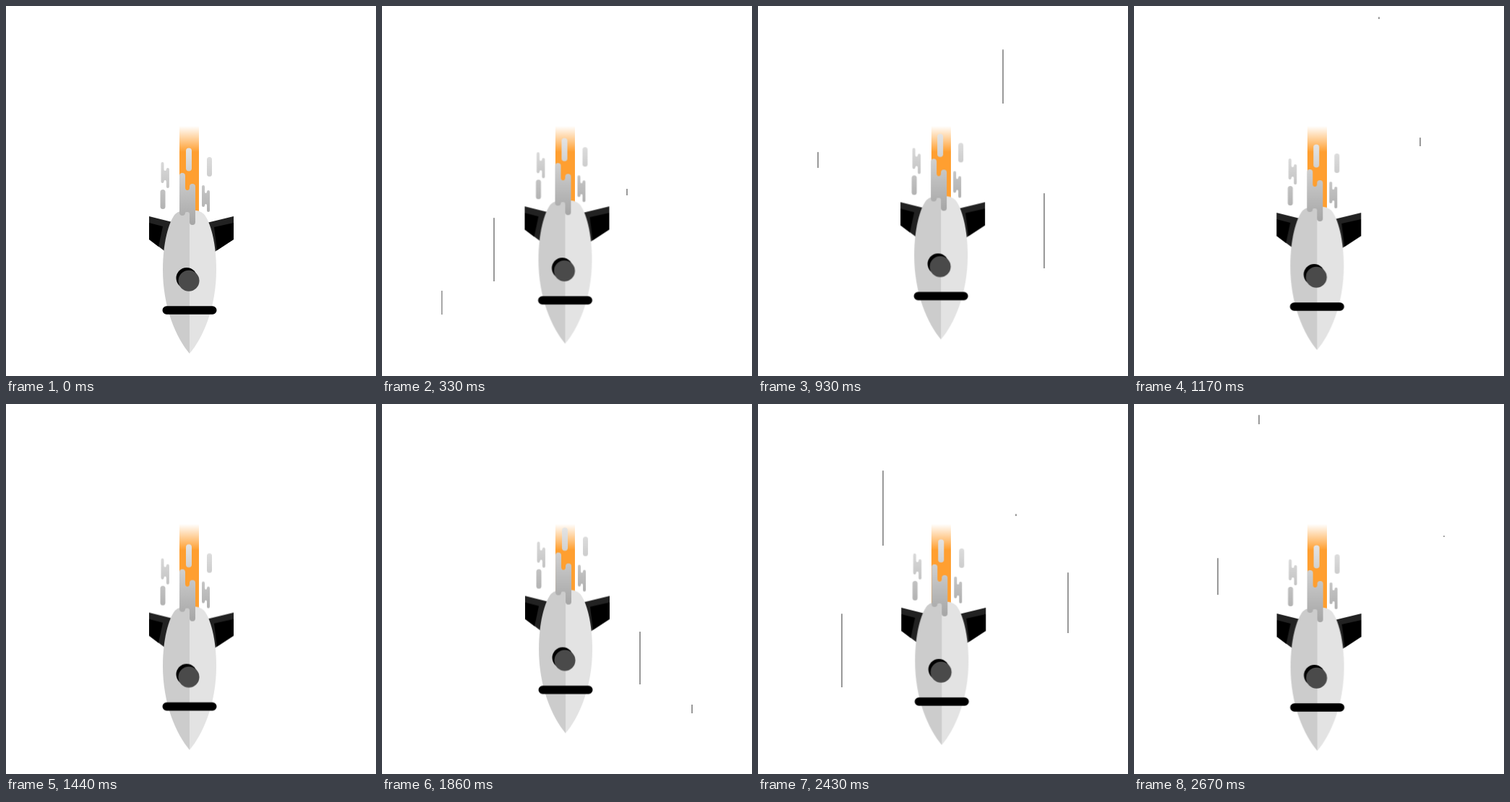
Recreate the animation shown at these times as an HTML page. Size 512 px wide and 512 px high, loop 2700 ms.

```html
<!DOCTYPE html>
<html lang="en">
<head>
<meta charset="utf-8">
<title>Rocket</title>
<style>
  html, body { margin: 0; width: 100%; height: 100%; overflow: hidden; background: #fff; }
  .stage { position: relative; width: 512px; height: 512px; overflow: hidden; }
  svg { position: absolute; inset: 0; display: block; }

  .bob { animation: bob 675ms cubic-bezier(.37, 0, .63, 1) infinite alternate; }
  .shake { animation: shake 2700ms linear infinite; }
  @keyframes bob { to { transform: translateY(-28px); } }
  @keyframes shake {
    0%, 100% { transform: translate(0, 0); }
    24.4% { transform: translate(-1px, -.3px); }
    43.3% { transform: translate(-.7px, -.4px); }
    47.8% { transform: translate(-1.4px, -.8px); }
    50% { transform: translate(-.6px, -1px); }
    53.3% { transform: translate(0, -1.2px); }
    68.9% { transform: translate(0, -1.3px); }
    75% { transform: translate(.5px, 1px); }
    81.1% { transform: translate(1px, 1.7px); }
    98.9% { transform: translate(-.4px, -1px); }
  }

  /* Speed lines: the head rises evenly, the tail catches up late. */
  .late { animation: late 2700ms step-end infinite; }
  .mirror { position: absolute; inset: 0; transform: scaleX(-1); }
  .line {
    position: absolute; width: 2px; height: 247px;
    left: calc(var(--x) * 1px - 1px); top: calc(var(--y) * 1px - 247px);
    animation: tail 2700ms linear infinite;
    animation-delay: calc(var(--t) * 1ms - 2700ms);
  }
  .line i {
    position: absolute; inset: 0; background: #999; border-radius: 1px;
    transform-origin: bottom;
    animation: head 2700ms linear infinite;
    animation-delay: inherit;
  }
  @keyframes head {
    0% { transform: scaleY(0); }
    28.52%, 100% { transform: scaleY(1); }
  }
  @keyframes tail {
    0% { clip-path: inset(0); visibility: visible; animation-timing-function: cubic-bezier(.96, 0, .62, 1); }
    32.2% { clip-path: inset(0 0 245px 0); visibility: visible; animation-timing-function: step-start; }
    32.3%, 100% { clip-path: inset(0 0 245px 0); visibility: hidden; }
  }
  @keyframes late {
    0% { opacity: 0; }
    50%, 100% { opacity: 1; }
  }
</style>
</head>
<body>
<div class="stage">
  <div id="early"></div>
  <div class="late"><div class="mirror" id="late"></div></div>
  <svg width="512" height="512" viewBox="0 0 512 512">
    <defs>
      <linearGradient id="fire" gradientUnits="userSpaceOnUse" x1="0" y1="166" x2="0" y2="202">
        <stop offset="0" stop-color="#fff"/>
        <stop offset="1" stop-color="#ff9f30"/>
      </linearGradient>
      <linearGradient id="smoke" gradientUnits="userSpaceOnUse" x1="0" y1="197" x2="0" y2="303">
        <stop offset="0" stop-color="#e4e4e4"/>
        <stop offset="1" stop-color="#a6a6a6"/>
      </linearGradient>
    </defs>
    <rect x="240" y="166" width="27" height="122" fill="url(#fire)"/>
    <g class="bob"><g class="shake">
      <g fill="#222">
        <path d="M198 291L230 299L222 341L198 323Z"/>
        <path d="M315 291L278 300L286 342L315 323Z"/>
      </g>
      <path d="M198 300L217 305L211 333L198 323ZM315 300L288 306L292 338L315 323Z"/>
      <path fill="#ccc" d="M254 481C236 460 217 418 217 365C217 328 225 299 234 288Q240 282 254 282Z"/>
      <path fill="#e3e3e3" d="M254 481C272 460 291 418 291 365C291 328 283 299 274 288Q268 282 254 282Z"/>
      <circle cx="250" cy="376.5" r="14.5"/>
      <circle cx="253" cy="380.3" r="14.5" fill="#4a4a4a"/>
      <rect x="216.5" y="415.3" width="75" height="11.4" rx="5.7"/>
      <g fill="url(#smoke)">
        <rect x="249" y="196.5" width="8" height="32" rx="4"/>
        <rect x="278" y="209" width="7" height="27" rx="3.5"/>
        <rect x="213.5" y="254" width="7" height="27" rx="3.5"/>
        <path d="M214.5 218a2 2 0 0 1 4 0V226q0 2 1.7 2t1.7-2a2 2 0 0 1 4 0V250a2 2 0 0 1-4 0V243q0-2-1.7-2t-1.7 2a2 2 0 0 1-4 0Z"/>
        <path d="M271 250a2 2 0 0 1 4 0V257q0 2 1.5 2t1.5-2a2 2 0 0 1 4 0V283a2 2 0 0 1-4 0V276q0-2-1.5-2t-1.5 2a2 2 0 0 1-4 0Z"/>
        <path d="M240 235a4 4 0 0 1 8 0V251q0 4 3 4t3-4V250a4 4 0 0 1 8 0V299a4 4 0 0 1-8 0V288q0-3-3-3t-3 1a4 4 0 0 1-8 0Z"/>
      </g>
    </g></g>
  </svg>
</div>
<script>
  // Each line: x, lowest y, start time in ms.
  const lines = [[155, 398.6, 0], [83, 428.6, 222], [339, 262, 302], [396, 425.6, 409]];
  const lineHtml = delay => lines.map(([x, y, t]) =>
    `<div class="line" style="--x:${x};--y:${y};--t:${t + delay}"><i></i></div>`).join('');
  document.getElementById('early').innerHTML = lineHtml(0);
  document.getElementById('late').innerHTML = lineHtml(1598);
</script>
</body>
</html>
```
